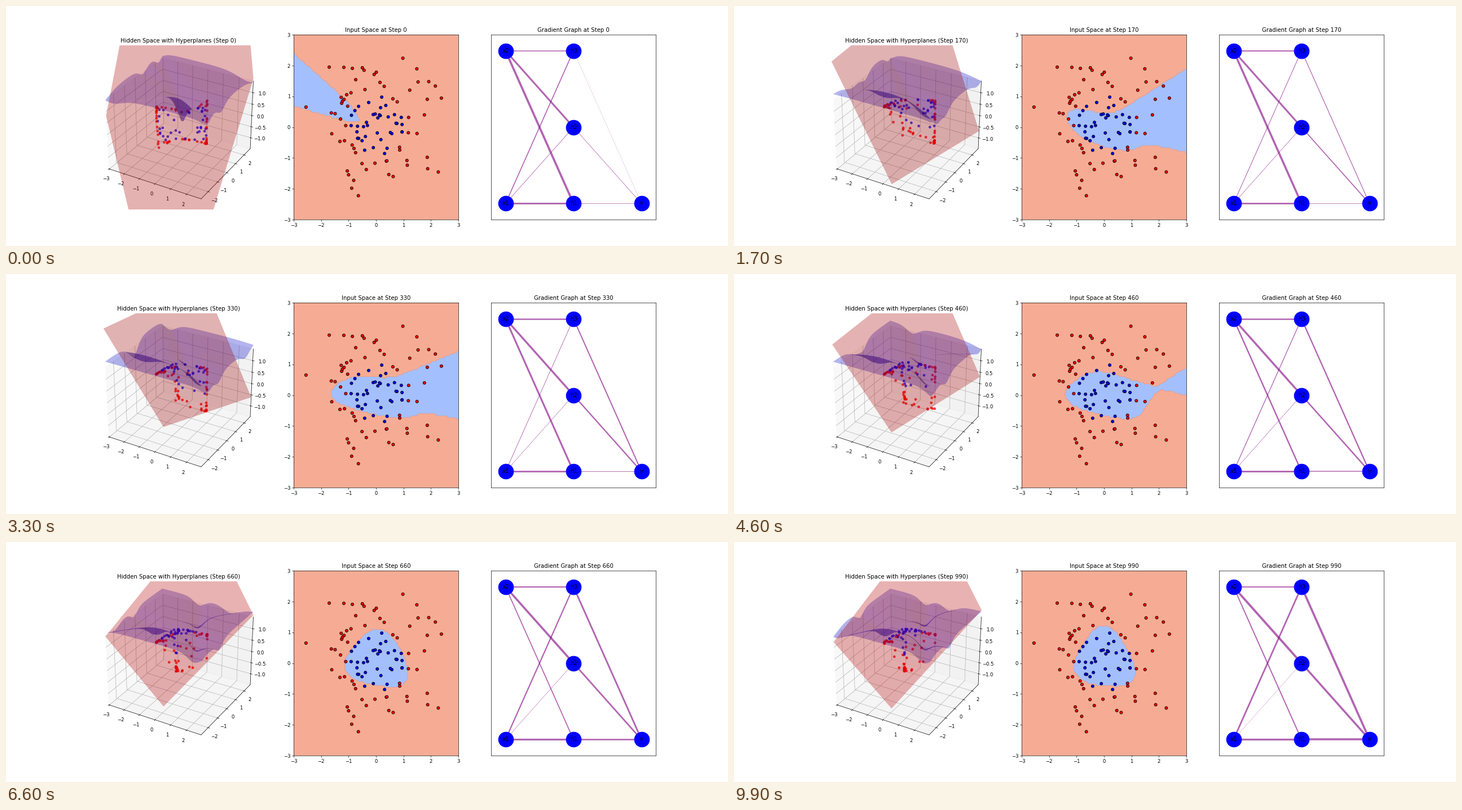
Recreate the animation shown at these times as a matplotlib script. Size 1280 by 427 pixels, loop 10 s.

```python
import numpy as np
import matplotlib.pyplot as plt
from matplotlib.animation import FuncAnimation
from matplotlib.collections import LineCollection

FRAMES, STEPS_PER_FRAME, WARMUP, LR = 100, 10, 10, 0.1
DPI = 61


def make_data(n=100):
    np.random.seed(0)
    pts = np.random.randn(n, 2)
    return pts, np.where((pts ** 2).sum(axis=1) > 1, 1.0, -1.0)[:, None]


class Net:
    """Two inputs, three tanh units, one tanh output."""

    def __init__(self):
        np.random.seed(0)
        self.w1, self.b1 = np.random.randn(2, 3), np.zeros(3)
        self.w2, self.b2 = np.random.randn(3, 1), np.zeros(1)

    def train(self, x, y, steps):
        n = len(x)
        for _ in range(steps):
            h = np.tanh(x @ self.w1 + self.b1)
            d2 = (np.tanh(h @ self.w2 + self.b2) - y) / n
            d1 = d2 @ self.w2.T * (1 - h ** 2)
            self.w2 = self.w2 - LR * h.T @ d2
            self.b2 = self.b2 - LR * d2.sum(axis=0)
            self.w1 = self.w1 - LR * x.T @ d1
            self.b1 = self.b1 - LR * d1.sum(axis=0)

    def weights(self):
        return self.w1, self.b1, self.w2, self.b2


def grid(xlim, ylim, n):
    return np.meshgrid(np.linspace(*xlim, n), np.linspace(*ylim, n))


def hidden(xx, yy, w1, b1):
    return np.tanh(np.stack([xx, yy], axis=-1) @ w1 + b1)


X, Y = make_data()
net = Net()
net.train(X, Y, WARMUP)
history = []
for _ in range(FRAMES):
    net.train(X, Y, STEPS_PER_FRAME)
    history.append(net.weights())

XLIM, YLIM = [(c.min() - 0.5, c.max() + 0.5) for c in X.T]
surf_x, surf_y = grid(XLIM, YLIM, 40)
plane_x, plane_y = grid(XLIM, YLIM, 2)
area_x, area_y = grid((-3, 3), (-3, 3), 100)

fig = plt.figure(figsize=(1280 / DPI, 427 / DPI), dpi=DPI)
ax_hidden = fig.add_subplot(131, projection="3d")
ax_input = fig.add_subplot(132)
ax_graph = fig.add_subplot(133)

ax_input.scatter(*X.T, c=Y.ravel(), cmap="bwr", edgecolors="k", zorder=2)

NODES = {"x1": (0, 0), "x2": (0, 1), "h1": (0.5, 0), "h2": (0.5, 0.5),
         "h3": (0.5, 1), "y": (1, 0)}
EDGES = [(f"x{i}", f"h{j}") for i in (1, 2) for j in (1, 2, 3)]
EDGES += [(f"h{j}", "y") for j in (1, 2, 3)]
links = LineCollection([(NODES[a], NODES[b]) for a, b in EDGES],
                       colors="purple", alpha=0.6, zorder=1)
ax_graph.add_collection(links)
ax_graph.scatter(*zip(*NODES.values()), s=1000, c="blue", zorder=2)
for name, pos in NODES.items():
    ax_graph.text(*pos, name, size=12, ha="center", va="center", zorder=3)
ax_graph.set(xlim=(-0.105, 1.105), ylim=(-0.105, 1.105), xticks=[], yticks=[])

changing = []


def update(frame):
    w1, b1, w2, b2 = history[frame]
    step = frame * STEPS_PER_FRAME
    while changing:
        changing.pop().remove()

    h = np.tanh(X @ w1 + b1)
    changing.append(ax_hidden.scatter(*h.T, c=Y.ravel(), cmap="bwr", alpha=0.7))
    plane = -(w2[0] * plane_x + w2[1] * plane_y + b2) / w2[2]
    changing.append(ax_hidden.plot_surface(plane_x, plane_y, plane,
                                           color="red", alpha=0.3))
    norm = np.linalg.norm(hidden(surf_x, surf_y, w1, b1), axis=-1)
    changing.append(ax_hidden.plot_surface(surf_x, surf_y, norm, color="blue",
                                           alpha=0.3, rcount=40, ccount=40))
    ax_hidden.set(xlim=XLIM, ylim=YLIM,
                  zlim=(h[:, 2].min() - 0.5, h[:, 2].max() + 0.5))
    ax_hidden.set_title(f"Hidden Space with Hyperplanes (Step {step})")

    out = (hidden(area_x, area_y, w1, b1) @ w2 + b2)[..., 0]
    changing.append(ax_input.contourf(area_x, area_y, np.sign(out), levels=[-1, 0, 1],
                                      cmap="coolwarm", alpha=0.8))
    ax_input.set(xlim=(-3, 3), ylim=(-3, 3))
    ax_input.set_title(f"Input Space at Step {step}")

    links.set_linewidth(2 * np.abs(np.concatenate([w1.ravel(), w2.ravel()])))
    ax_graph.set_title(f"Gradient Graph at Step {step}")


anim = FuncAnimation(fig, update, frames=FRAMES, interval=100,
                     init_func=lambda: None, repeat=True, repeat_delay=0)
plt.show()
```
